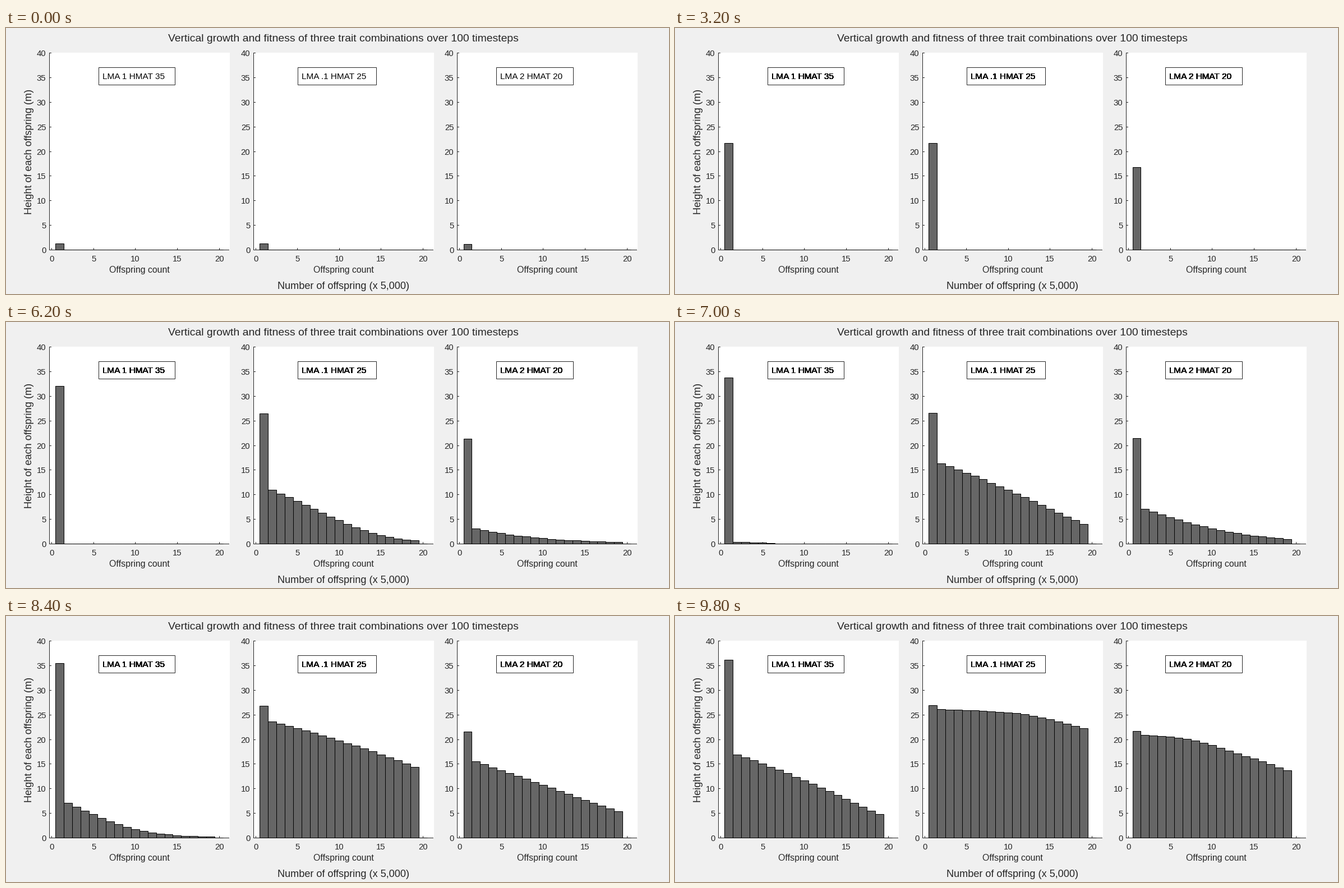
These frames come from a looping animation (1182 px wide and 474 px high, 9.9 s). A matplotlib script:

```python
import math

import matplotlib.pyplot as plt
import numpy as np
from matplotlib.animation import FuncAnimation
from matplotlib.patches import Rectangle

plt.rcParams["font.family"] = "Liberation Sans"
plt.rcParams["path.snap"] = False

W, H, DPI = 1182, 474, 100
FRAMES, STEP_MS = 99, 100
PX = 72 / DPI               # points per pixel
INK, BAR = "#262626", "#666666"
X_UNIT, Y_UNIT, BASE, TOP = 14.93, 8.775, 395, 44
BARS, COPIES = 20, 9
SEED, SUB = .137, 20        # starting height, substeps per timestep


def grow(limit, rate, juvenile, mature):
    """Heights from seed on: slow start, then decline, stalling at maturity."""
    h, heights = SEED, []
    for _ in range(120 * SUB):
        heights.append(h)
        speed = rate * (limit - h) * math.tanh(h / juvenile)
        stall = 1 + math.exp(60 * (h / mature - 1.01))
        h += speed / stall / SUB
    return np.array(heights)


class Panel:
    def __init__(self, left, origin, box_left, box_right, text, heights,
                 parent_age, first_birth):
        self.heights = heights
        self.parent_age, self.first_birth = parent_age, first_birth
        draw_axes(left, origin)
        self.bars = []
        for n in range(1, BARS + 1):
            a, b = pixel_x(origin, n - .5), pixel_x(origin, n + .5)
            self.bars.append(box(a, BASE, b, BASE, BAR))
        box(box_left, 70, box_right, 101, "white", INK, zorder=4)
        # The legend is printed again at each step, which thickens it.
        self.legend = [label(box_left + 7, 91.3, text, 15.4, ha="left",
                             color="black", zorder=5) for _ in range(COPIES)]

    def height(self, n, step):
        """Bar 0 is the parent; one more seed starts at each step."""
        if n == BARS - 1:
            return 0
        age = step + self.parent_age
        if n > 0:
            age = step - self.first_birth - (n - 1)
        return self.heights[int(round(age * SUB))] if age >= 0 else 0

    def update(self, step):
        for n, bar in enumerate(self.bars):
            y = pixel_y(self.height(n, step))
            bar.set_y(y + .5)
            bar.set_height(BASE - y)
        for i, copy in enumerate(self.legend):
            copy.set_visible(i <= step)


def label(x, y, text, size, ha="center", color=INK, **kw):
    return ax.text(x, y, text, fontsize=size * PX, ha=ha, va="baseline",
                   color=color, **kw)


def line(x0, y0, x1, y1):
    ax.plot([x0, x1], [y0, y1], color=INK, lw=PX, solid_capstyle="butt",
            zorder=2)


def box(x0, y0, x1, y1, face, edge="black", zorder=3):
    """Rectangle whose outline runs through the given pixels."""
    rect = Rectangle((x0 + .5, y0 + .5), x1 - x0, y1 - y0, facecolor=face,
                     edgecolor=edge, lw=PX, zorder=zorder)
    return ax.add_patch(rect)


def pixel_x(origin, value):
    return int(np.floor(origin + X_UNIT * value + .5))


def pixel_y(value):
    return int(round(BASE - Y_UNIT * value))


def draw_axes(left, origin):
    ax.add_patch(Rectangle((left, TOP), 322, BASE + 1 - TOP,
                           facecolor="white", lw=0, zorder=1))
    line(left + .5, TOP, left + .5, BASE + 1)
    line(left, BASE + .5, left + 321, BASE + .5)
    for v in range(0, 41, 5):
        y = pixel_y(v) + .5
        line(left, y, left + 4, y)
        label(left - 5.7, y + 5.3, str(v), 14.9, ha="right")
    for v in range(0, 21, 5):
        x = pixel_x(origin, v) + .5
        line(x, BASE - 3, x, BASE + 1)
        label(x, 416, str(v), 14.9)
    label(left + 161, 436.3, "Offspring count", 15.9)


fig = plt.figure(figsize=(W / DPI, H / DPI), dpi=DPI, facecolor="#f0f0f0")
ax = fig.add_axes([0, 0, 1, 1])
ax.set_xlim(0, W)
ax.set_ylim(H, 0)
ax.axis("off")

label(601, 24.3, "Vertical growth and fitness of three trait combinations "
      "over 100 timesteps", 19.4)
label(601, 465.3, "Number of offspring (x 5,000)", 18.1)
label(46, 220, "Height of each offspring (m)", 18.2, rotation=90,
      rotation_mode="anchor")

panels = [
    Panel(77, 81, 165, 301, "LMA 1 HMAT 35",
          grow(42, .0238, 3.8, 35), 8.8, 66),
    Panel(441, 444.5, 520, 660, "LMA .1 HMAT 25",
          grow(42, .0238, 3.8, 25), 8.8, 39),
    Panel(804, 808.1, 874, 1011, "LMA 2 HMAT 20",
          grow(60, .0129, 5.5, 20), 15.3, 39),
]


def update(step):
    for panel in panels:
        panel.update(step)
    return []


anim = FuncAnimation(fig, update, frames=FRAMES, interval=STEP_MS,
                     init_func=lambda: update(0), repeat=True,
                     repeat_delay=0, blit=False)
plt.show()
```
